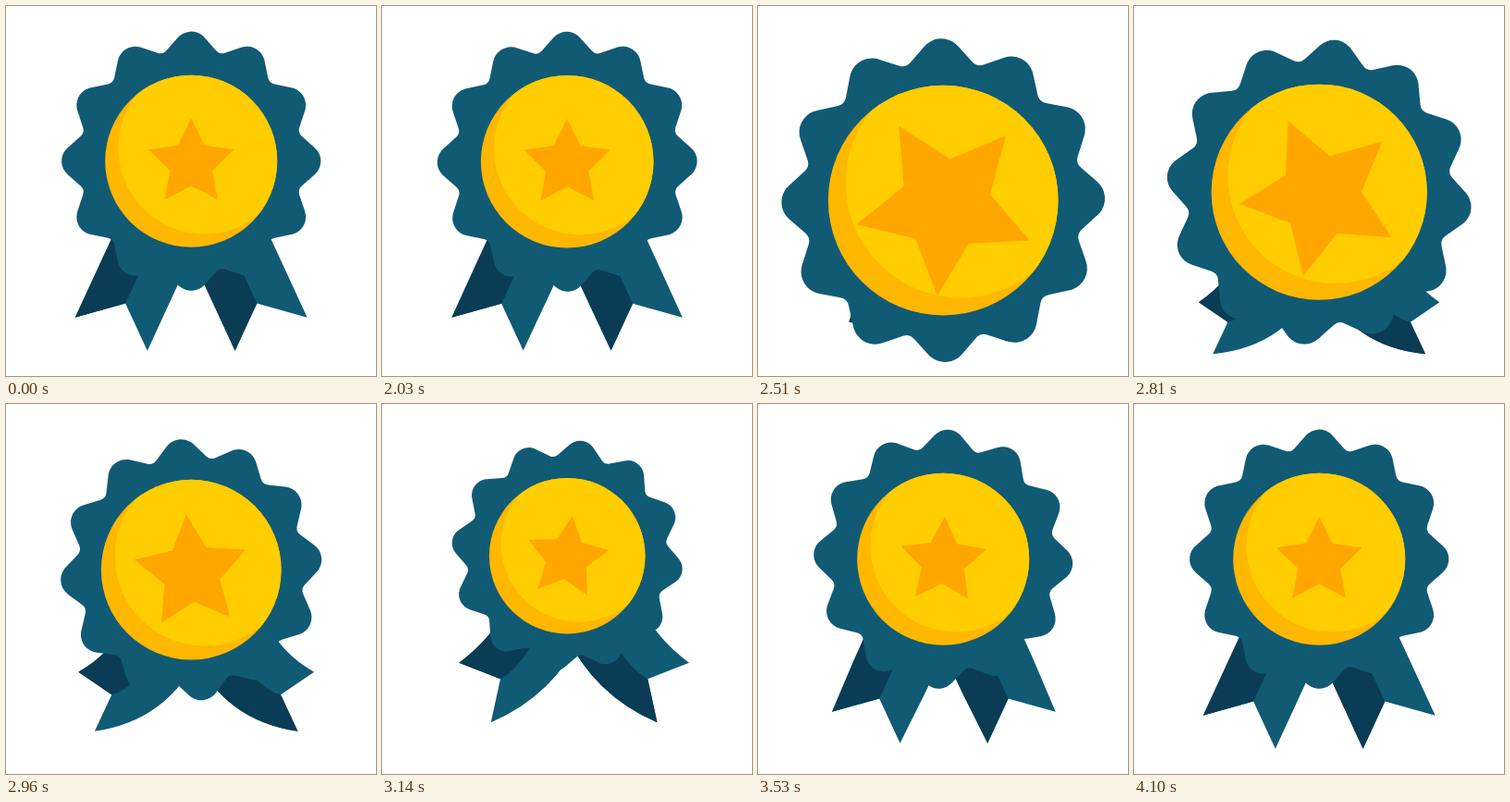
An HTML page with a canvas for the animation above (4.16 s loop, 400 by 400 pixels).

```html
<!DOCTYPE html>
<html lang="en">
<head>
<meta charset="utf-8">
<title>Award rosette</title>
<style>
  html, body { margin: 0; width: 100%; height: 100%; overflow: hidden; background: #fff; }
  canvas { display: block; width: 400px; height: 400px; }
</style>
</head>
<body>
<canvas id="stage" width="400" height="400"></canvas>
<script>
const ctx = document.getElementById('stage').getContext('2d');
const LOOP = 4160, START = 2030, STEP = 30;
const TEAL = '#115a74', NAVY = '#0a3c55', GOLD = '#ffcd00', SHADE = '#ffb700', ORANGE = '#ffa600';
const TILT = 24.8, HALF = 43;
const rad = deg => deg * Math.PI / 180;

function ease(t, from, to) {
  const u = Math.min(1, Math.max(0, (t - from) / (to - from)));
  return (1 - Math.cos(Math.PI * u)) / 2;
}

// Swells to `peak` by `risen`, swings past rest to `-dip`, then settles
function swell(t, peak, dip, risen, settled = 3540) {
  return peak * ease(t, 2000, risen) -
    (peak + dip) * ease(t, 2675, 3140) +
    dip * ease(t, 3140, settled);
}

// Ribbons shrink behind the rosette, then grow back ever more slowly
function tuck(t) {
  const regrow = Math.exp(-Math.max(0, t - 2380) / 420);
  return 0.9 * ease(t, 2000, 2443) * regrow * (1 - ease(t, 3530, 4100));
}

function fill(color) {
  ctx.fillStyle = color;
  ctx.fill();
}

function disc(x, y, r) {
  ctx.beginPath();
  ctx.arc(x, y, r, 0, Math.PI * 2);
}

const along = ([x, y], deg, len) => [x + Math.sin(rad(deg)) * len, y + Math.cos(rad(deg)) * len];
const across = ([x, y], deg, len) => [x + Math.cos(rad(deg)) * len, y - Math.sin(rad(deg)) * len];

// A forked ribbon whose tip is scaled and curled outwards
function ribbon(side, length, curl, scale) {
  const bend = TILT + curl, mid = TILT + curl / 2;
  const end = along([0, 0], TILT + 0.3 * curl, length);
  const notch = along(end, bend, -36.5 * scale);
  const knee = along(end, bend, -60);
  const root = along(knee, TILT, -60);
  const kneeHalf = HALF / Math.cos(rad(curl / 2));
  const tip = sign => across(end, bend, sign * HALF * scale);
  const edge = sign => across(knee, mid, sign * kneeHalf);
  const base = sign => across(root, TILT, sign * HALF);

  ctx.save();
  ctx.scale(side, 1);

  ctx.beginPath();
  ctx.moveTo(...base(1));
  ctx.quadraticCurveTo(...edge(1), ...tip(1));
  ctx.lineTo(...notch);
  ctx.lineTo(...tip(-1));
  ctx.quadraticCurveTo(...edge(-1), ...base(-1));
  fill(TEAL);

  ctx.beginPath();
  ctx.moveTo(...root);
  ctx.quadraticCurveTo(...knee, ...notch);
  ctx.lineTo(...tip(-side));
  ctx.quadraticCurveTo(...edge(-side), ...base(-side));
  fill(NAVY);

  ctx.restore();
}

function rosette() {
  const cap = 19.3, reach = 140.1 - cap, valley = 119.2, spread = rad(49);
  const at = (r, a) => [r * Math.cos(a), r * Math.sin(a)];
  ctx.beginPath();
  for (let i = 0; i < 12; i++) {
    const a = rad(i * 30 - 90), next = a + rad(30);
    const [x, y] = at(reach, a), [nx, ny] = at(reach, next);
    const [tx, ty] = at(cap, next - spread);
    ctx.arc(x, y, cap, a - spread, a + spread);
    ctx.arcTo(...at(valley, a + rad(15)), nx + tx, ny + ty, 9);
  }
  ctx.closePath();
  fill(TEAL);
}

function coin(r) {
  ctx.save();
  disc(0, 0, r);
  fill(SHADE);
  ctx.clip();
  disc(r * 0.152, -r * 0.152, r);
  fill(GOLD);
  ctx.restore();
}

function star() {
  ctx.beginPath();
  for (let i = 0; i < 10; i++) {
    const r = i % 2 ? 24.2 : 48.6, a = rad(i * 36 - 90);
    ctx.lineTo(r * Math.cos(a), 2.5 + r * Math.sin(a));
  }
  ctx.closePath();
  fill(ORANGE);
}

function turned(deg, scale, draw) {
  ctx.save();
  ctx.rotate(rad(deg));
  ctx.scale(scale, scale);
  draw();
  ctx.restore();
}

function render(time) {
  const t = time < START ? 0 : START + Math.floor((time - START) / STEP) * STEP;
  const drop = swell(t, 42.4, 3.5, 2400);
  const grow = swell(t, 0.248, 0.105, 2450);
  const coinGrow = swell(t, 0.337, 0.094, 2481);
  const starGrow = swell(t, 1.034, 0.05, 2517);
  const turn = -swell(t, 31, 7.4, 2540, 3760);
  const shrink = tuck(t);
  const curl = 50 * (ease(t, 2270, 2810) - ease(t, 2940, 3530));
  const length = 206 - 95 * shrink + 90 * grow;

  ctx.fillStyle = '#fff';
  ctx.fillRect(0, 0, 400, 400);
  ctx.save();
  ctx.translate(200.2, 167.7 + drop);
  ctx.save();
  ctx.translate(0.3 * turn + 0.14 * curl, 0);
  for (const side of [-1, 1]) ribbon(side, length, curl, 1 - shrink);
  ctx.restore();
  turned(turn, 1 + grow, rosette);
  coin(93 * (1 + coinGrow));
  turned(turn, 1 + starGrow, star);
  ctx.restore();
}

const begin = performance.now();
function tick() {
  render((performance.now() - begin) % LOOP);
  requestAnimationFrame(tick);
}
tick();
</script>
</body>
</html>
```
